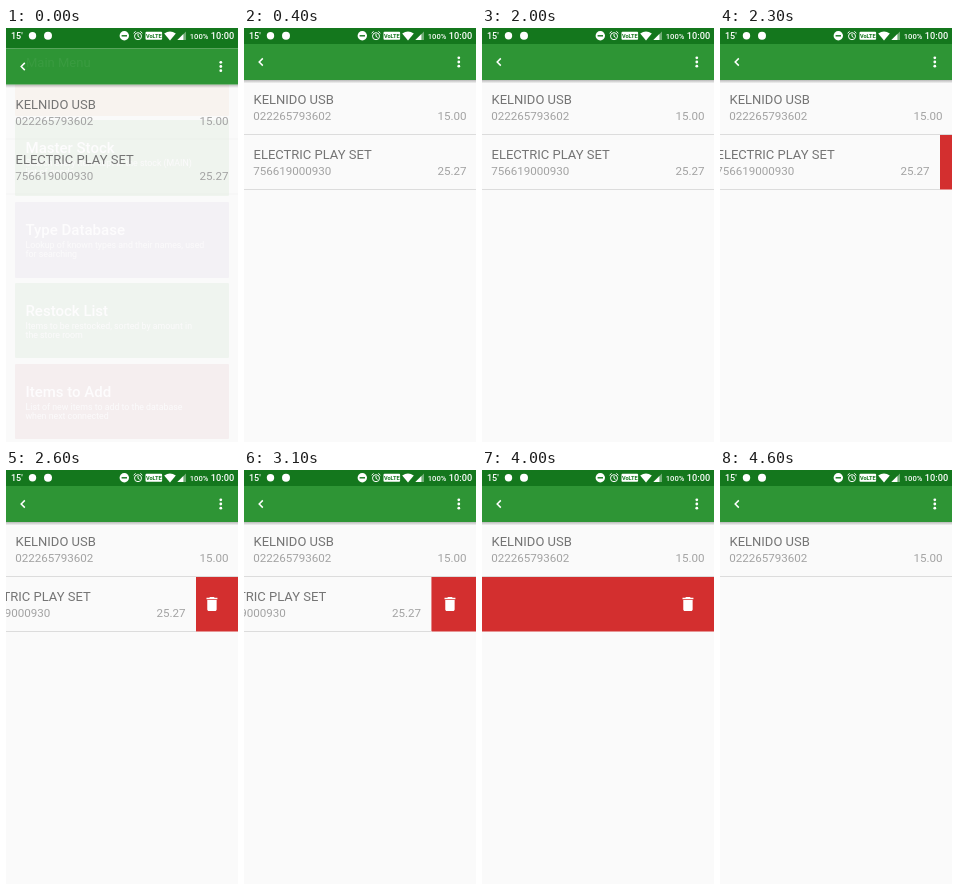
An HTML page for the animation above (5.1 s loop, 232 px wide and 414 px high).

```html
<!DOCTYPE html>
<html lang="en">
<head>
<meta charset="utf-8">
<title>Swipe to delete</title>
<style>
  html, body { margin: 0; width: 100%; height: 100%; overflow: hidden; background: #fafafa; }
  svg { display: block; width: 100vw; height: 100vh; font-family: Roboto, Arial, sans-serif; }
  .name { font-size: 13px; fill: #757575; }
  .detail { font-size: 11.6px; fill: #a3a3a3; }
  .end { text-anchor: end; }
  .heading { font-size: 15px; font-weight: 500; fill: #fdfcfd; }
  .note { font-size: 8.8px; fill: #fbfafb; }
  .status { fill: #fff; font-weight: 500; }
</style>
</head>
<body>
<svg viewBox="0 0 232 414" preserveAspectRatio="none">
  <defs>
    <linearGradient id="shade" x2="0" y2="1">
      <stop stop-color="#000" stop-opacity=".26"/>
      <stop offset="1" stop-color="#000" stop-opacity="0"/>
    </linearGradient>
  </defs>
  <rect width="232" height="414" fill="#fafafa"/>
  <g id="ghost"></g>

  <g id="screen">
    <g id="second">
      <g id="bin">
        <rect y="107" width="232" height="54.5" fill="#d32f2f"/>
        <path transform="translate(196.6 124.6) scale(.78)" fill="#fff"
          d="M6 19c0 1.1.9 2 2 2h8c1.1 0 2-.9 2-2V7H6zM19 4h-3.5l-1-1h-5l-1 1H5v2h14z"/>
      </g>
      <g id="slider">
        <rect id="cover" y="107" width="233" height="55" fill="#fafafa"/>
        <text class="name" x="9.5" y="131.2">ELECTRIC PLAY SET</text>
        <text class="detail" x="9.2" y="147.1">756619000930</text>
        <text class="detail end" x="222.6" y="147.1">25.27</text>
        <rect class="rule" y="161" width="233" height="1" fill="#dcdcdc"/>
      </g>
    </g>
    <text class="name" x="9.5" y="76.2">KELNIDO USB</text>
    <text class="detail" x="9.2" y="92.1">022265793602</text>
    <text class="detail end" x="222.6" y="92.1">15.00</text>
    <rect class="rule" y="106" width="232" height="1" fill="#dcdcdc"/>

    <rect y="52" width="232" height="3.5" fill="url(#shade)"/>
    <rect y="8" width="232" height="8" fill="#14771d"/>
    <rect y="16" width="232" height="36" fill="#2e9535"/>
    <path d="M18.8 30.4L15.2 34l3.6 3.6" fill="none" stroke="#fff" stroke-width="1.5"/>
    <g fill="#fff">
      <circle cx="214.8" cy="29.8" r="1.4"/>
      <circle cx="214.8" cy="34" r="1.4"/>
      <circle cx="214.8" cy="38.2" r="1.4"/>
    </g>
  </g>
  <text id="ghostTitle" x="20" y="39" font-size="13" fill="#fff">Main Menu</text>

  <g class="status">
    <rect width="232" height="16" fill="#14771d"/>
    <text x="5" y="11.3" font-size="9">15'</text>
    <circle cx="26.5" cy="7.8" r="3.7"/>
    <circle cx="42" cy="7.8" r="4"/>
    <circle cx="118.3" cy="7.8" r="4.7"/>
    <rect x="115.6" y="7.1" width="5.4" height="1.4" fill="#14771d"/>
    <g fill="none" stroke="#fff" stroke-width="1">
      <circle cx="132" cy="8.2" r="3.5"/>
      <path d="M132 6v2.4l1.6 1M127.6 5.2l2-1.8M136.4 5.2l-2-1.8"/>
    </g>
    <rect x="139.5" y="3.8" width="16.6" height="8" rx="1"/>
    <text x="147.8" y="10" font-size="5.6" font-weight="700" text-anchor="middle" fill="#14771d">VoLTE</text>
    <path d="M158.2 5.6Q164 1.4 169.8 5.6L164 12.4z"/>
    <path d="M180 3.4V12h-8.6z" opacity=".4"/>
    <path d="M177.4 6V12h-6z"/>
    <text x="183.8" y="11" font-size="7.6">100%</text>
    <text x="204.8" y="11.3" font-size="9.2">10:00</text>
  </g>
</svg>
<script>
const LOOP = 5100, STEP = 100;
const $ = id => document.getElementById(id);

// Cards of the menu that fades away behind the list.
const cards = [
  [-10, 88, "#f8f3ef"],
  [92, 168, "#eff4ee", "Master Stock", "Search every item kept in the stock (MAIN)", "list of goods"],
  [174, 250, "#f3f1f5", "Type Database", "Lookup of known types and their names, used", "for searching"],
  [255, 330, "#eff4ef", "Restock List", "Items to be restocked, sorted by amount in", "the store room"],
  [336, 411, "#f5eeef", "Items to Add", "List of new items to add to the database", "when next connected"]
];
$("ghost").innerHTML = cards.map(([top, bottom, fill, title, ...notes]) =>
  `<rect x="9" y="${top}" width="214" height="${bottom - top}" rx="1" fill="${fill}"/>` +
  (title ? `<text class="heading" x="19.5" y="${top + 33}">${title}</text>` : "") +
  notes.map((note, i) => `<text class="note" x="19.5" y="${top + 46 + i * 9}">${note}</text>`).join("")
).join("");

// Linear interpolation through [time, value] pairs.
function along(keys, t) {
  const next = keys.findIndex(([time]) => time > t);
  if (next < 0) return keys[keys.length - 1][1];
  if (next === 0) return keys[0][1];
  const [t0, v0] = keys[next - 1], [t1, v1] = keys[next];
  return v0 + (v1 - v0) * (t - t0) / (t1 - t0);
}

const swipe = [[2100, 0], [2200, 4], [2300, 13], [2400, 25], [2500, 36], [2600, 43],
  [2900, 43], [3600, 52], [3700, 105], [3800, 180], [3900, 233]];
const REMOVED = 4100;

function draw(time) {
  const t = Math.floor(time % LOOP / STEP) * STEP;
  const fade = Math.max(0, 1 - t / 400) ** 3;
  const shift = along(swipe, t);
  const swiped = shift > 0;

  $("screen").setAttribute("transform", `translate(0 ${4.5 * fade})`);
  $("ghost").setAttribute("opacity", fade);
  $("ghostTitle").setAttribute("opacity", fade * .05);
  document.querySelectorAll(".rule").forEach(rule => rule.setAttribute("opacity", 1 - .85 * fade));
  $("cover").setAttribute("opacity", swiped ? 1 : 0);
  $("bin").setAttribute("visibility", swiped ? "visible" : "hidden");
  $("slider").setAttribute("transform", `translate(${-shift} 0)`);
  $("second").setAttribute("display", t < REMOVED ? "inline" : "none");
}

const start = performance.now();
function tick() {
  draw(performance.now() - start);
  requestAnimationFrame(tick);
}
tick();
</script>
</body>
</html>
```
